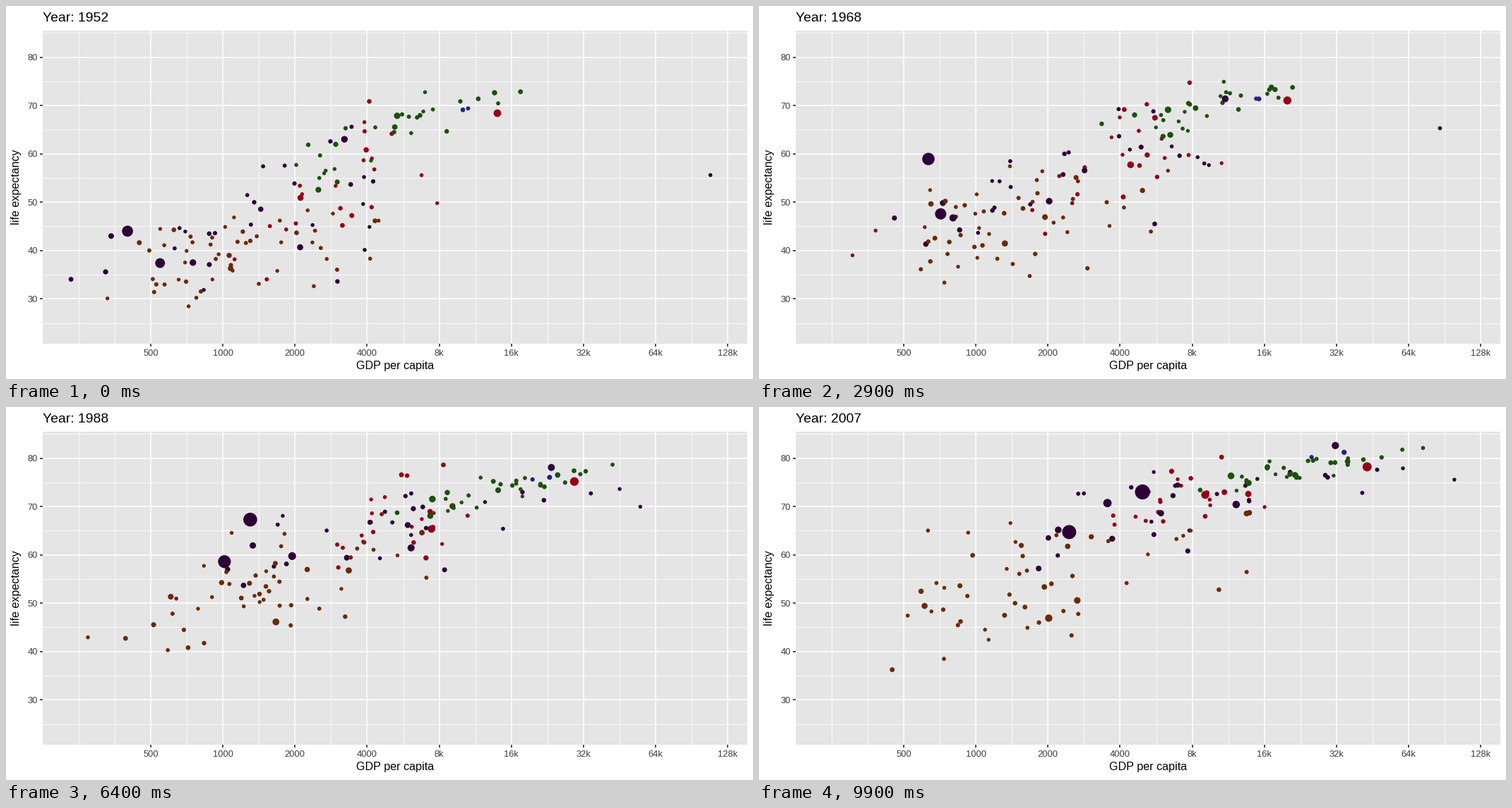
Recreate the animation shown at these times as a matplotlib script. Size 1058 by 529 pixels, loop 10000 ms.

```python
import numpy as np
import matplotlib.pyplot as plt
from matplotlib.animation import FuncAnimation

W, H, DPI = 1058, 529, 64
FRAMES, INTERVAL = 100, 100
FIRST, LAST = 1952, 2007
SURVEYS = np.arange(FIRST, LAST + 1, 5)
LEFT, RIGHT, TOP, BOTTOM = 52, 1050, 35, 479
OCTAVE = 102.15

AFRICA, AMERICAS, ASIA = "#6a2a08", "#930019", "#2d0037"
EUROPE, OCEANIA = "#1c500f", "#20247f"

plt.rcParams["font.family"] = ["Liberation Sans", "DejaVu Sans"]


def pt(px):
    return px * 72 / DPI


def px_x(log_gdp):
    return 205 + (log_gdp - np.log2(500)) * OCTAVE


def px_y(life):
    return 72.5 + (80 - life) * 6.856


fig = plt.figure(figsize=(W / DPI, H / DPI), dpi=DPI, facecolor="white")
ax = fig.add_axes([0, 0, 1, 1])
ax.set(xlim=(0, W), ylim=(H, 0))
ax.axis("off")


def label(x, y, s, size, color="black", **kw):
    return ax.text(x, y, s, fontsize=pt(size), color=color, va="baseline", **kw)


def line(x0, y0, x1, y1, width, color):
    ax.plot([x0, x1], [y0, y1], color=color, lw=pt(width), zorder=1,
            solid_capstyle="butt")


def draw_axes():
    ax.add_patch(plt.Rectangle((LEFT, TOP), RIGHT - LEFT, BOTTOM - TOP,
                               fc="#e5e5e5", ec="none", zorder=0))
    for i in range(-2, 17):
        x = 205 + i * OCTAVE / 2
        major = i >= 0 and i % 2 == 0
        line(x, TOP, x, BOTTOM, 1.56 if major else 0.78, "white")
        if major:
            line(x, BOTTOM, x, BOTTOM + 4, 1.56, "#222222")
            k = i // 2
            text = str(500 * 2 ** k) if k < 4 else f"{2 ** (k - 1)}k"
            label(x, 496.3, text, 12.9, "#3c3c3c", ha="center")
    for v in range(25, 86, 5):
        y = px_y(v)
        major = v % 10 == 0
        line(LEFT, y, RIGHT, y, 1.56 if major else 0.78, "white")
        if major:
            line(LEFT - 4, y, LEFT, y, 1.56, "#222222")
            label(45, y + 4.6, str(v), 12.9, "#3c3c3c", ha="right")
    label(551, 515, "GDP per capita", 16.1, ha="center")
    label(19.5, 257, "life expectancy", 16.1, ha="center", rotation=90,
          rotation_mode="anchor")


rng = np.random.default_rng(7)
paths, colors, roots, growths = [], [], [], []


def add(path, color, root_pop, growth):
    paths.append(path)
    colors.append(color)
    roots.append(root_pop)
    growths.append(growth)


def scores(n):
    """Seeded z-scores that drift a little from survey to survey."""
    z = rng.standard_normal((n, 2))
    z = (z - z.mean(0)) / z.std(0)
    steps = []
    for _ in SURVEYS:
        steps.append(np.clip(z, -2.2, 2.2))
        z = 0.97 * z + 0.24 * rng.standard_normal((n, 2))
    return np.array(steps)


def cloud(color, n, top, growth, gdp, gdp_sd, life, life_sd, corr):
    """n dots around a trend whose values are set at four dates."""
    dates = [1952, 1967, 1987, 2007]
    mx, sx, my, sy, c = (np.interp(SURVEYS, dates, v)[:, None]
                         for v in (gdp, gdp_sd, life, life_sd, corr))
    z = scores(n)
    x = mx + sx * z[..., 0]
    y = my + sy * (c * z[..., 0] + np.sqrt(1 - c ** 2) * z[..., 1])
    ceiling = np.interp(SURVEYS, [FIRST, LAST], [73, 82.5])[:, None]
    y = ceiling - 1.2 * np.logaddexp(0, (ceiling - y) / 1.2)
    for k in range(n):
        root_pop = top * (1 - np.log(k + 1) / np.log(n + 1))
        add(np.c_[x[:, k], y[:, k]], color, root_pop, growth)


def landmark(color, pop, growth, *stops):
    """One dot through a few (year, gdp, life) stops."""
    years, gdp, life = np.array(stops, float).T
    path = np.c_[np.interp(SURVEYS, years, np.log2(gdp)),
                 np.interp(SURVEYS, years, life)]
    add(path, color, np.sqrt(pop), growth)


landmark(OCEANIA, 20, 0.45, (1952, 10040, 69.1), (1972, 16789, 71.9),
         (2007, 34435, 81.2))
landmark(OCEANIA, 4, 0.45, (1952, 10557, 69.4), (1972, 16046, 71.9),
         (2007, 25185, 80.2))
cloud(AMERICAS, 23, 8, 0.4,
      gdp=(11.6, 12.05, 12.45, 13), gdp_sd=(0.68, 0.7, 0.7, 0.82),
      life=(52.5, 59.7, 67.7, 73.2), life_sd=(8.8, 8, 5.6, 4.2),
      corr=(0.6, 0.6, 0.55, 0.65))
cloud(ASIA, 28, 12, 0.4,
      gdp=(10.5, 11.15, 12.1, 12.75), gdp_sd=(1.2, 1.45, 1.65, 1.75),
      life=(46.5, 54.8, 65, 70.6), life_sd=(8.8, 9, 8, 7.5),
      corr=(0.5, 0.65, 0.75, 0.78))
cloud(AFRICA, 50, 9.2, 0.27,
      gdp=(10.1, 10.4, 10.5, 10.75), gdp_sd=(0.92, 1, 1.2, 1.35),
      life=(39.1, 45.3, 53.4, 54.8), life_sd=(4.9, 5.8, 7.6, 9.2),
      corr=(0.3, 0.35, 0.65, 0.55))
cloud(EUROPE, 30, 9.8, 0.75,
      gdp=(12.3, 13.15, 13.85, 14.45), gdp_sd=(0.85, 0.7, 0.68, 0.78),
      life=(64.6, 69.8, 73.7, 77.8), life_sd=(6, 3.6, 3, 2.8),
      corr=(0.83, 0.78, 0.85, 0.88))

landmark(AFRICA, 135, 0.25, (1952, 1077, 36.3), (1982, 1577, 45.9),
         (2007, 2014, 46.9))
landmark(AFRICA, 9, 0.28, (1952, 493, 40), (1987, 848, 44),
         (1992, 737, 23.6), (2007, 863, 46.2))
landmark(AMERICAS, 190, 0.3, (1952, 2109, 50.9), (1977, 6660, 61.5),
         (2007, 9066, 72.4))
landmark(AMERICAS, 301, 0.52, (1952, 13990, 68.4), (1967, 19530, 70.8),
         (1992, 32004, 76.1), (2007, 42952, 78.2))
landmark(ASIA, 2.5, 0.1, (1952, 108382, 55.6), (1967, 80895, 64.6),
         (1972, 109348, 67.7), (1982, 31354, 71.3), (2007, 47307, 77.6))
landmark(ASIA, 127, 0.68, (1952, 3217, 63), (1972, 14779, 73.4),
         (1992, 26825, 79.4), (2007, 31656, 82.6))
landmark(ASIA, 223, 0.37, (1952, 750, 37.5), (1967, 763, 46),
         (1992, 2383, 62.7), (2007, 3541, 70.7))
landmark(ASIA, 1110, 0.34, (1952, 547, 37.4), (1962, 658, 43.6),
         (1982, 856, 56.6), (1992, 1164, 60.2), (2007, 2452, 64.7))
landmark(ASIA, 1319, 0.42, (1952, 400, 44), (1962, 488, 44.5),
         (1967, 613, 58.4), (1982, 962, 65.5), (1992, 1656, 68.7),
         (2002, 3119, 72), (2007, 4959, 73))

paths = np.stack(paths, axis=1)
roots, growths = np.array(roots), np.array(growths)

draw_axes()
title = label(52, 22, "", 19.4)
dots = ax.scatter(*np.zeros((2, len(roots))), c=colors, linewidths=0, zorder=3)


def update(i):
    u = i / (FRAMES - 1)
    title.set_text(f"Year: {FIRST + (LAST - FIRST) * u:.0f}")
    # straight moves from one survey to the next
    s = u * (len(SURVEYS) - 1)
    k = min(int(s), len(SURVEYS) - 2)
    p = paths[k] + (paths[k + 1] - paths[k]) * (s - k)
    dots.set_offsets(np.c_[px_x(p[:, 0]), px_y(p[:, 1])])
    r = 2.65 + 0.22 * roots * np.sqrt(growths + (1 - growths) * u)
    dots.set_sizes(pt(2 * r) ** 2)
    return title, dots


anim = FuncAnimation(fig, update, frames=FRAMES, interval=INTERVAL,
                     repeat=True, repeat_delay=0, blit=False)
plt.show()
```
